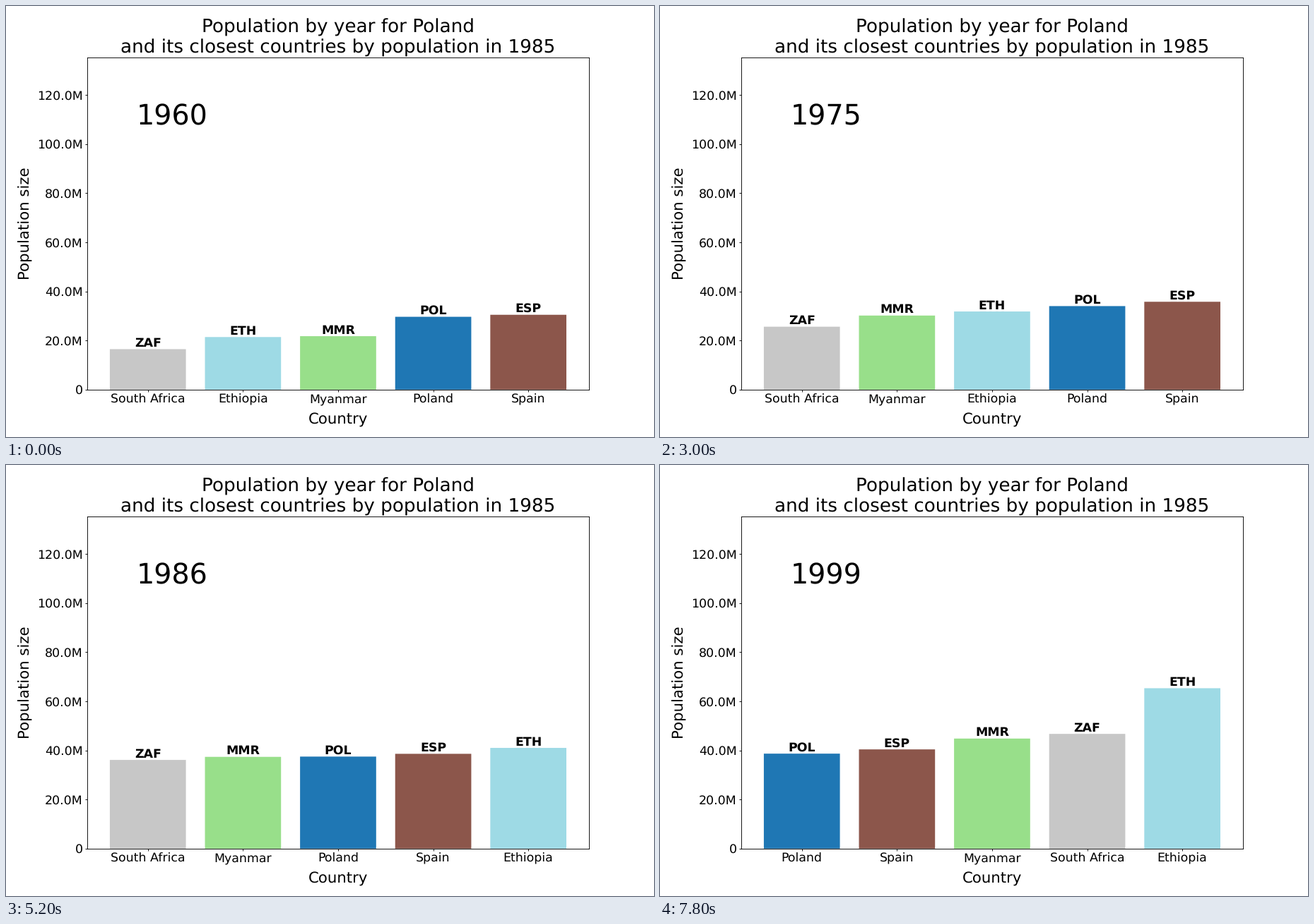
Write a matplotlib script that moves like this. It is 917 px wide and 611 px high and loops after 8000 ms.

```python
import numpy as np
import matplotlib.pyplot as plt
from matplotlib.animation import FuncAnimation

W, H, DPI = 917, 611, 100
PT = 72 / DPI  # points per pixel
START, YEARS = 1960, 40
TOP = 135.126  # upper end of the y axis, in millions

KEY_YEARS = np.array([1960, 1969, 1975, 1981, 1986, 1989, 1999])

# code: (name, colour, population in millions at the key years)
COUNTRIES = {
    "POL": ("Poland", "#1f77b4", [29.64, 32.4, 34.0, 35.9, 37.46, 37.96, 38.66]),
    "ESP": ("Spain", "#8c564b", [30.46, 33.3, 35.76, 37.76, 38.59, 38.83, 40.39]),
    "MMR": ("Myanmar", "#98df8a", [21.75, 26.5, 30.15, 33.85, 37.35, 39.15, 44.8]),
    "ETH": ("Ethiopia", "#9edae5", [21.4, 27.0, 31.8, 35.3, 41.0, 45.8, 65.3]),
    "ZAF": ("South Africa", "#c7c7c7", [16.46, 21.5, 25.6, 30.5, 36.1, 39.7, 46.7]),
}


def population(code, year):
    """Smooth cubic curve through a country's key values."""
    vals = np.array(COUNTRIES[code][2])
    slope = np.gradient(vals, KEY_YEARS)
    i = min(np.searchsorted(KEY_YEARS, year, side="right"), len(vals) - 1) - 1
    step = KEY_YEARS[i + 1] - KEY_YEARS[i]
    t = (year - KEY_YEARS[i]) / step
    ease = t * t * (3 - 2 * t)
    bend = t * (1 - t) * ((1 - t) * slope[i] - t * slope[i + 1])
    return vals[i] + (vals[i + 1] - vals[i]) * ease + step * bend


plt.rcParams["font.family"] = "DejaVu Sans"
plt.rcParams["text.hinting"] = "none"
fig = plt.figure(figsize=(W / DPI, H / DPI), dpi=DPI, facecolor="white")
ax = fig.add_axes([0.125, 0.11, 0.775, 0.77])


def put(x, y, text, size, **kw):
    """Write centred text with its baseline at a pixel position from the top left."""
    return fig.text(x / W, 1 - y / H, text, fontsize=size * PT,
                    ha="center", va="baseline", **kw)


n = len(COUNTRIES)
bars = ax.bar(range(n), [1] * n, width=0.8, snap=False)
ax.set_xlim(-0.64, n - 0.36)
ax.set_ylim(0, TOP)
ticks = range(0, 121, 20)
ax.set_yticks(ticks, [f"{t:.1f}M" if t else "0" for t in ticks])
ax.set_xticks(range(n), [""] * n)
ax.tick_params(length=3.1 * PT, width=0.9 * PT, labelsize=17.4 * PT, pad=3.1 * PT)
for spine in ax.spines.values():
    spine.set_linewidth(0.9 * PT)

ax.set_title("Population by year for Poland\n"
             "and its closest countries by population in 1985",
             fontsize=26.3 * PT, pad=6.8 * PT)
put(470, 592, "Country", 21.3)
put(33.5, 308.5, "Population size", 21.3, rotation=90, rotation_mode="anchor")
year_text = put(235.3, 168.6, "", 39.6)
codes = [ax.annotate("", (i, 0), xytext=(0, 3.5 * PT), textcoords="offset points",
                     ha="center", va="baseline", weight="bold", fontsize=17.4 * PT)
         for i in range(n)]


def draw(frame):
    year = START + frame
    size = {code: population(code, year) for code in COUNTRIES}
    order = sorted(size, key=size.get)
    for i, (code, bar, label) in enumerate(zip(order, bars, codes)):
        bar.set_height(size[code])
        bar.set_facecolor(COUNTRIES[code][1])
        label.set_text(code)
        label.xy = (i, size[code])
    ax.set_xticklabels([COUNTRIES[code][0] for code in order])
    year_text.set_text(str(year))
    return [*bars, *codes, year_text]


anim = FuncAnimation(fig, draw, frames=YEARS, interval=200,
                     repeat=True, repeat_delay=0, blit=False)
plt.show()
```
